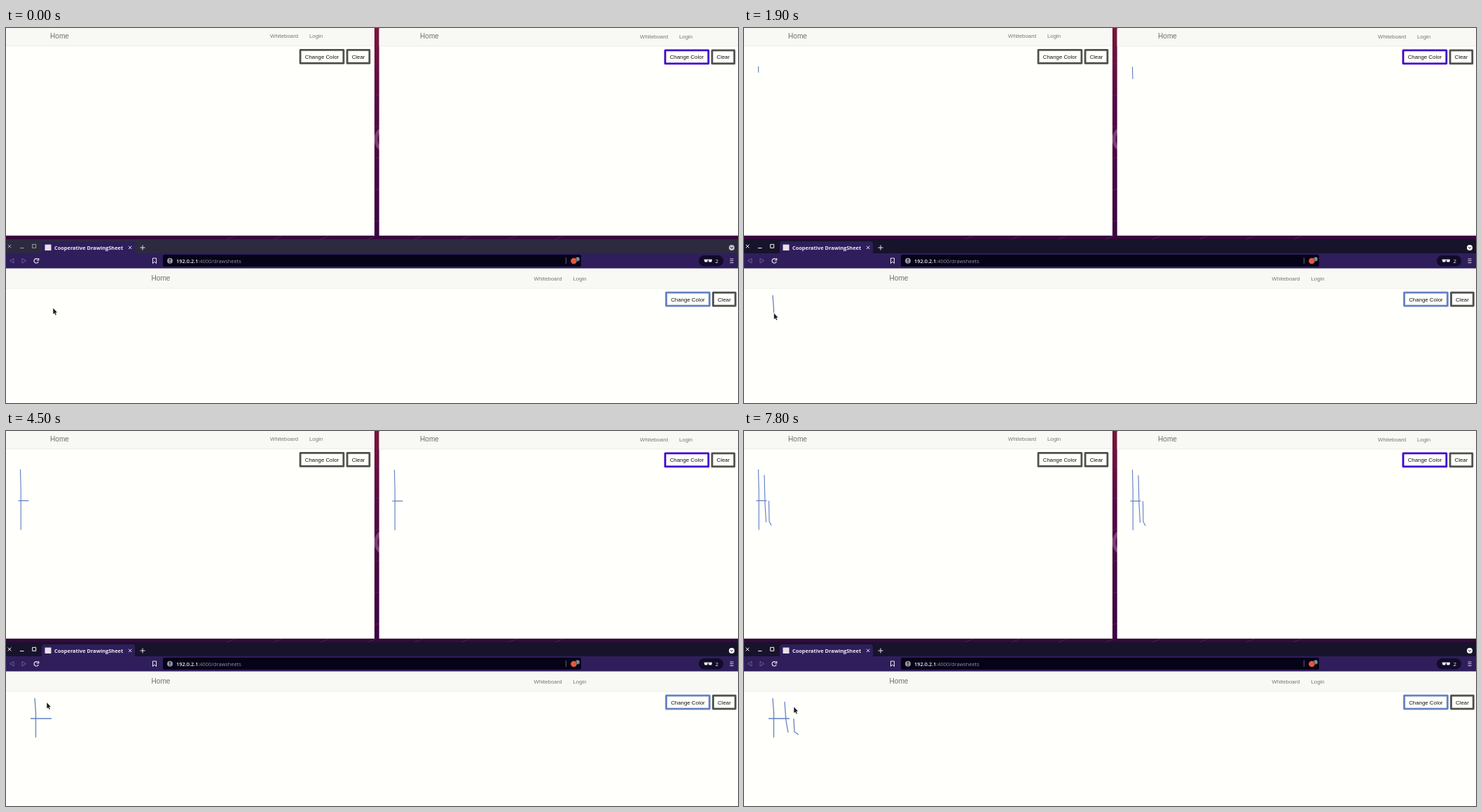
An HTML page with a canvas that plays this animation: 1045x536 px, repeating every 8000 ms.

```html
<!DOCTYPE html>
<html lang="en">
<head>
<meta charset="utf-8">
<title>Shared drawing</title>
<style>
html, body { margin: 0; width: 100%; height: 100%; overflow: hidden; background: #fffffb; }
canvas { display: block; }
</style>
</head>
<body>
<canvas id="stage" width="1045" height="536"></canvas>
<script>
const c = document.getElementById('stage').getContext('2d');
const LOOP = 8000, STEP = 100, FOCUS_AT = 400;
const PAGE = '#fffffb', GREY = '#50504c', BLUE = '#6480c6', PALE = '#e8e5f0';
const SANS = '"Liberation Sans", Arial, sans-serif';
const UI = '"Open Sans", "Noto Sans", sans-serif';

// Pen strokes: corners are passed at even time steps
const strokes = [
  { from: 1500, to: 2200, points: [[41, 382], [42.5, 402], [42.5, 438]] },
  { from: 3200, to: 4000, points: [[35, 411], [65, 411]] },
  { from: 4800, to: 5400, points: [[58, 387], [60, 414], [63, 431]] },
  { from: 6800, to: 7400, points: [[71, 411], [72, 430], [78, 434]] }
];

// Places where the pointer turns or rests between strokes
const hovers = [
  { t: 0, p: [67, 400] }, { t: 1200, p: [41, 381] }, { t: 2500, p: [42, 424] },
  { t: 2700, p: [34, 409] }, { t: 4300, p: [58, 388] }, { t: 5700, p: [80, 415] },
  { t: 6400, p: [71, 410] }, { t: 7800, p: [71, 394] }, { t: LOOP, p: [71, 394] }
];

const strokeKeys = strokes.flatMap(({ from, to, points }) => points.map((p, i) =>
  ({ t: from + (to - from) * i / (points.length - 1), p, pen: i > 0 })));
const path = [...hovers, ...strokeKeys].sort((a, b) => a.t - b.t);

function between(a, b, t) {
  let k = Math.min(1, (t - a.t) / (b.t - a.t));
  if (!b.pen) k = k * k * (3 - 2 * k);
  return a.p.map((v, i) => v + (b.p[i] - v) * k);
}

function pointer(t) {
  const i = path.findIndex(key => key.t > t);
  return between(path[i - 1], path[i], t);
}

function box(x, y, w, h, fill, r = 0) {
  c.fillStyle = fill;
  c.beginPath();
  c.roundRect(x, y, w, h, r);
  c.fill();
}

function disc(x, y, r, fill) {
  c.fillStyle = fill;
  c.beginPath();
  c.arc(x, y, r, 0, 7);
  c.fill();
}

function ring(x, y, r, color, width, start = 0, end = 7) {
  c.strokeStyle = color;
  c.lineWidth = width;
  c.beginPath();
  c.arc(x, y, r, start, end);
  c.stroke();
}

function line(points, color, width = 1) {
  c.strokeStyle = color;
  c.lineWidth = width;
  c.beginPath();
  for (let i = 0; i < points.length; i += 2) c.lineTo(points[i], points[i + 1]);
  c.stroke();
}

function cross(x, y, r, color) {
  line([x - r, y - r, x + r, y + r], color);
  line([x + r, y - r, x - r, y + r], color);
}

function text(s, x, y, font, color) {
  c.font = font;
  c.fillStyle = color;
  c.fillText(s, x, y);
}

function button(label, x, y, w, color) {
  box(x, y, w, 21.7, color, 1.5);
  box(x + 2.8, y + 2.8, w - 5.6, 16.1, PAGE);
  c.textAlign = 'center';
  text(label, x + w / 2, y + 13.8, '7.85px ' + SANS, '#111');
  c.textAlign = 'left';
}

function page({ x, y, w, h, nav, home, links, buttons, color }) {
  box(x, y, w, h, PAGE);
  box(x, y, w, nav, '#f8f8f5');
  box(x, y + nav, w, 0.7, '#e6e6e3');
  const base = y + nav - 10.5;
  text('Home', home, base, '10.1px ' + SANS, '#6f6f6d');
  text('Whiteboard', links, base - 0.3, '7.85px ' + SANS, '#777775');
  text('Login', links + 56, base - 0.3, '7.85px ' + SANS, '#777775');
  button('Change Color', buttons, y + nav + 5, 64.6, color);
  button('Clear', buttons + 67, y + nav + 5, 34.6, GREY);
}

function wallpaper() {
  const g = c.createLinearGradient(0, 0, 0, 300);
  g.addColorStop(0, '#7b1539');
  g.addColorStop(0.35, '#520b43');
  g.addColorStop(1, '#390540');
  box(526, 0, 8, 298, g);
  box(0, 296, 1045, 6, '#36083c');
  for (let y = 50; y < 290; y += 45) line([526, y + 2, 533, y], '#6d2355', 0.7);
  for (let x = 315; x < 800; x += 67) line([x, 302, x + 12, 297], '#4d2152');
  ring(545, 159, 17, '#7b3f73', 5);
}

function tabStrip(active) {
  const ink = active ? '#fff' : '#a5a2ad';
  box(0, 302, 1045, 20, active ? '#17132b' : '#2d2a40');
  cross(5, 312, 2.4, ink);
  line([20, 314.5, 25.5, 314.5], ink);
  c.strokeRect(37.7, 309.3, 5, 5);
  box(51, 305, 133, 20, '#2f1e5b', 4);
  box(55.5, 309.5, 9, 8.5, '#eadfe9');
  text('Cooperative DrawingSheet', 69, 316.8, 'bold 7.4px ' + UI, '#efedf5');
  cross(177.2, 313.8, 2.2, PALE);
  line([191.5, 314, 198.5, 314], PALE);
  line([195, 310.5, 195, 317.5], PALE);
  disc(1036, 314, 4, active ? '#fff' : '#c2bfca');
  line([1034, 313, 1036, 315, 1038, 313], '#26213b');
}

function toolbar() {
  box(0, 322, 1045, 22, '#2f1e5b');
  line([11, 329.5, 5.5, 332.7, 11, 336, 11, 329.5], '#716694', 0.9);
  line([23, 329.5, 28.5, 332.7, 23, 336, 23, 329.5], '#716694', 0.9);
  ring(43.3, 332.8, 3.2, PALE, 1.2, 0.4, 5.5);
  line([46.7, 329, 46.7, 332, 43.7, 332], PALE, 1.2);
  line([209.5, 336.5, 209.5, 329, 214.5, 329, 214.5, 336.5, 212, 334, 209.5, 336.5], PALE);

  box(224, 324, 597, 17, '#060318', 2.5);
  disc(234, 332.7, 4, '#9894a3');
  box(233.4, 330, 1.2, 3.2, '#060318');
  box(233.4, 334.2, 1.2, 1.2, '#060318');
  text('192.0.2.1', 243, 335.6, '600 7.4px ' + UI, '#f2f0f5');
  const host = c.measureText('192.0.2.1').width;
  text(':4000/drawsheets', 243 + host, 335.6, '7.4px ' + UI, '#96919f');
  box(799, 328, 0.8, 9, '#777184');
  disc(810.5, 333, 4.3, '#e5593d');
  box(813, 327.5, 6, 6, '#686574', 2);
  text('3', 814.7, 332.4, '5px ' + UI, '#fff');

  box(989, 325, 35, 15.5, '#120b29', 7.7);
  box(996.5, 330.7, 11.5, 1, '#fff');
  for (const x of [997, 1003]) box(x, 331, 4.7, 3.4, '#fff', 1.5);
  text('2', 1012.5, 335.8, '8px ' + UI, '#eee');
  for (let i = -1; i <= 1; i++) box(1033.5, 332.3 + i * 2.7, 5, 0.9, PALE);
}

function drawing(t, width, place) {
  c.strokeStyle = BLUE;
  c.lineWidth = width;
  c.lineJoin = 'round';
  c.beginPath();
  for (let i = 1; i < path.length && path[i - 1].t < t; i++) {
    const a = path[i - 1], b = path[i];
    if (!b.pen) continue;
    if (!a.pen) c.moveTo(...place(a.p));
    c.lineTo(...place(between(a, b, t)));
  }
  c.stroke();
}

function cursor([x, y]) {
  c.save();
  c.translate(x + 0.3, y + 0.6);
  c.beginPath();
  for (const p of [[0, 0], [0, 8.4], [1.9, 6.7], [3.4, 9.8], [4.6, 9.2], [3.2, 6.2], [5.7, 6]])
    c.lineTo(...p);
  c.closePath();
  c.strokeStyle = '#fff';
  c.lineWidth = 0.8;
  c.stroke();
  c.fillStyle = '#1c1c1c';
  c.fill();
  c.restore();
}

function render(now) {
  const t = Math.floor((now % LOOP) / STEP) * STEP;
  wallpaper();
  tabStrip(t >= FOCUS_AT);
  toolbar();
  page({ x: 0, y: 0, w: 526, h: 296.8, nav: 25, home: 63, links: 377, buttons: 418.7, color: GREY });
  page({ x: 532.7, y: 0.5, w: 513, h: 296.3, nav: 25, home: 591, links: 905, buttons: 939.6, color: '#4203cb' });
  page({ x: 0, y: 343.8, w: 1045, h: 193, nav: 28, home: 207.5, links: 753.5, buttons: 941.1, color: BLUE });

  // Remote boards trail the pen slightly
  const remote = (dx, dy) => ([x, y]) => [x / 2 + dx, (y - 382) * 1.54 + dy];
  drawing(t - 300, 1.15, remote(0, 55));
  drawing(t - 200, 1.15, remote(534, 55.5));
  drawing(t, 1.3, p => p);
  cursor(pointer(t));
}

function tick() {
  render(performance.now());
  requestAnimationFrame(tick);
}
tick();
</script>
</body>
</html>
```
